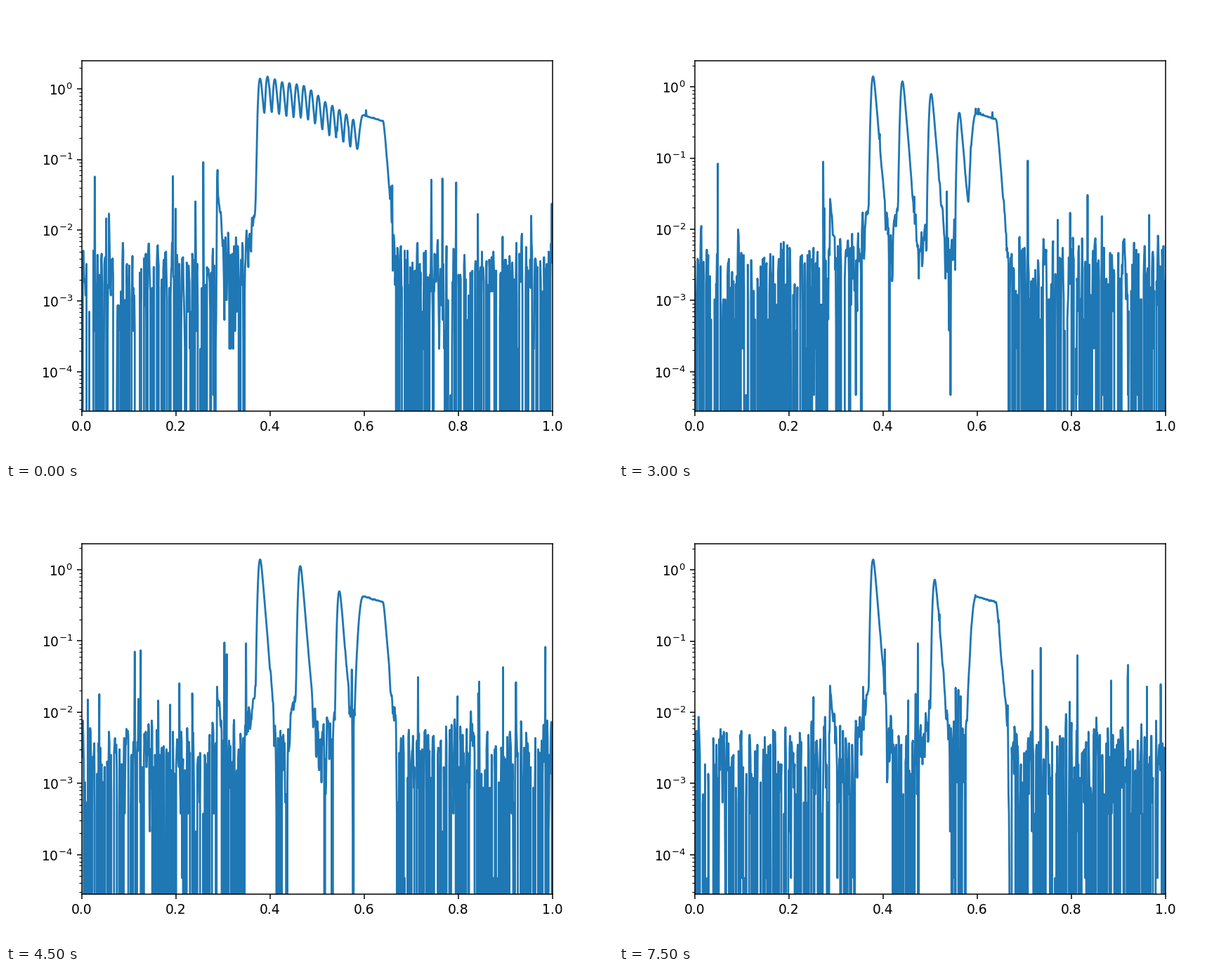
A matplotlib script for the animation above (8000 ms loop, 864 by 648 pixels).

```python
import numpy as np
import matplotlib.pyplot as plt
from matplotlib.animation import FuncAnimation

FRAMES, STEP_MS = 16, 500
N = 1024
COUNT, FLOOR = 1.65e-4, 4.7e-5   # detector step and smallest positive level
FALL, ROUND = 82, .0025          # right edge: decades per unit, corner radius

x = np.linspace(0, 1, N)


def profile(start, end, rise):
    """Depth in decades: curved rise before start, straight fall after end."""
    left = np.clip(start - x, 0, None)
    right = np.clip(x - end, 0, None)
    return -.6 * (left / rise) ** 2.4 - FALL * (np.hypot(right, ROUND) - ROUND)


def envelope(center):
    return np.interp(center, [.379, .395, .427, .470, .518, .577],
                     [1.4, 1.48, 1.23, 1.12, .64, .36])


def comb_line(u):
    center = .379 + .01575 * u - .00004 * u * u
    body = profile(center, center, .006)
    foot = np.where(x < center, -1.4 - 42 * (center - x), -9)
    return envelope(center) * 10 ** np.maximum(body, foot)


def band():
    return .42 * np.exp(-4.5 * (x - .6)) * 10 ** profile(.599, .640, .01255)


def signal(i):
    """Comb of lines whose spacing grows by half a unit each frame."""
    power = band() ** 2
    for u in np.arange(0, 13.6, 1 + i / 2):
        power += comb_line(u) ** 2
    return np.sqrt(power)


def side_bump(i):
    height = .025 + .03 * np.exp(-i / 3)
    return np.where(x >= .2865, height * np.exp(-(x - .2865) / .006), 0)


def noise(rng):
    raw = rng.normal(size=N + 2)
    return 7e-4 + 2.8e-3 * np.convolve(raw, [.28, .92, .28], "valid")


def spikes(rng, count=22):
    y = np.zeros(N)
    y[rng.integers(0, N, count)] = 10 ** rng.uniform(-1.9, -1, count)
    return y


def spectrum(i):
    rng = np.random.default_rng(100 + i)
    y = signal(i) * (1 + rng.normal(0, .004, N)) + side_bump(i)
    y += noise(rng) + spikes(rng)
    return np.round(y / COUNT) * COUNT + FLOOR


fig, ax = plt.subplots(figsize=(6.4, 4.8), dpi=135)
line, = ax.plot(x, spectrum(0))
ax.set_yscale("log", nonpositive="clip")
ax.set_xlim(0, 1)


def update(i):
    y = spectrum(i)
    line.set_ydata(y)
    low, high = np.log10(FLOOR), np.log10(y.max())
    pad = .05 * (high - low)
    ax.set_ylim(10 ** (low - pad), 10 ** (high + pad))
    return line,


anim = FuncAnimation(fig, update, frames=FRAMES, interval=STEP_MS,
                     init_func=lambda: update(0), repeat=True, repeat_delay=0)
plt.show()
```
